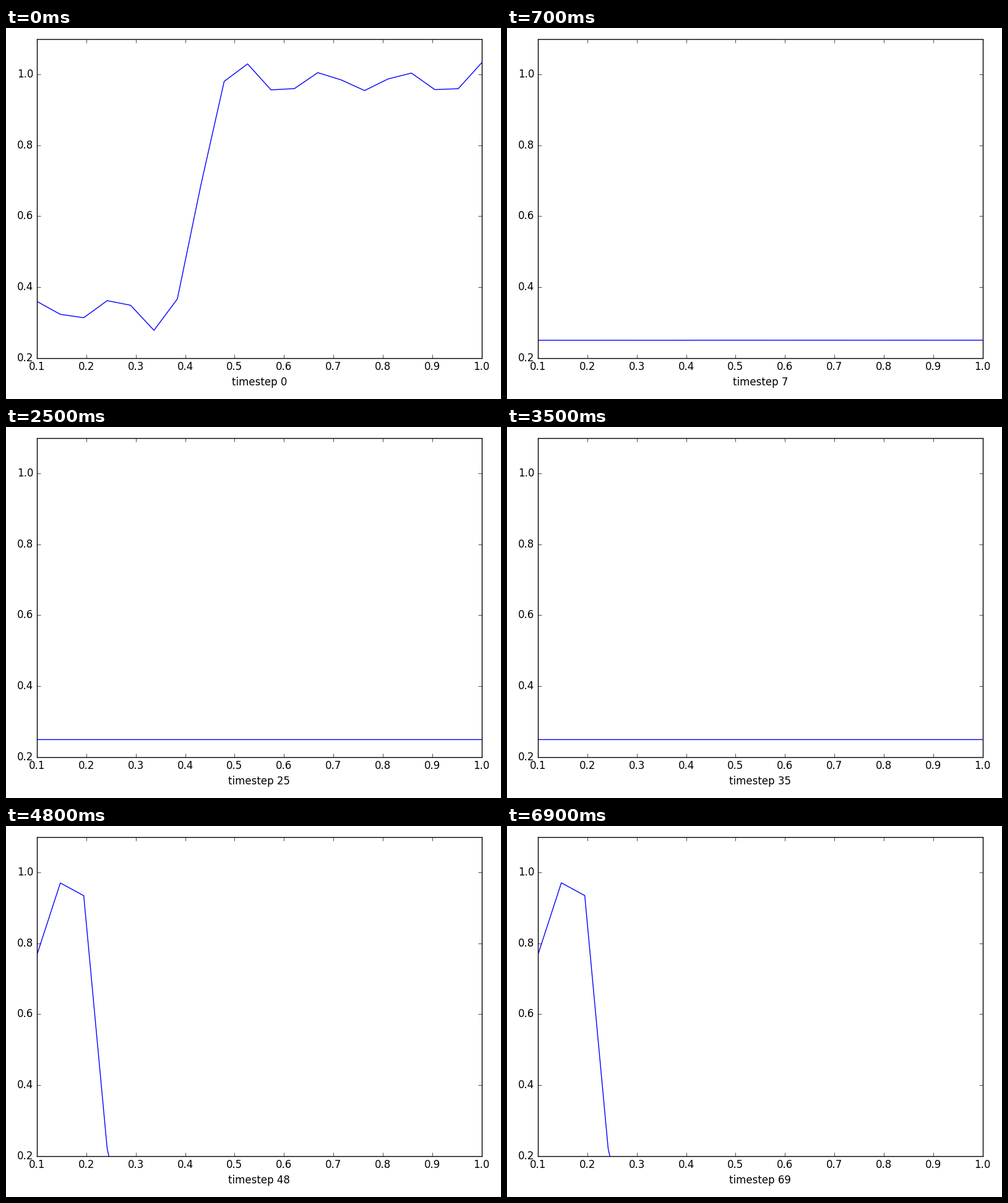
Recreate the animation shown at these times as a matplotlib script. Size 800 px wide and 600 px high, loop 7000 ms.

```python
import numpy as np
import matplotlib.pyplot as plt
from matplotlib.animation import FuncAnimation

W, H, DPI = 800, 600, 100
STEPS, INTERVAL = 70, 100
LEFT, RIGHT, TOP, BOTTOM = 50.0, 768.7, 17.95, 533.65
REST = 0.25

plt.style.use("classic")
plt.rcParams.update({"font.family": "DejaVu Sans", "font.size": 12})

x = np.linspace(0.1, 1.0, 20)


def ringing_step(x, center=0.4278, half_period=0.6679, mid=0.6575, amp=0.3225):
    """Square wave built from its first four odd harmonics."""
    u = np.pi * (x - center) / half_period
    return mid + amp * 4 / np.pi * sum(np.sin(n * u) / n for n in (1, 3, 5, 7))


start = ringing_step(x)
# Only the first points of the final curve rise into view.
end = np.full_like(x, -0.5)
end[:5] = 0.768, 0.971, 0.935, 0.221, -0.08


def curve(step):
    """Curve values at a time step."""
    if step < 9:  # the first curve settles to the rest level
        return REST + (start - REST) * 0.3 ** step
    if step < 12:  # short flat pulse: 1/2, 1/3, 1/4
        return np.full_like(x, 1 / (step - 7))
    # slow departure, then quick convergence
    if step <= 40:
        blend = 0.115 * max(0, step - 35) / 5
    else:
        blend = 1 - 0.885 * 0.4 ** (step - 40)
    return REST + (end - REST) * blend


fig = plt.figure(figsize=(W / DPI, H / DPI), dpi=DPI, facecolor="white")
ax = fig.add_axes([LEFT / W, 1 - BOTTOM / H,
                   (RIGHT - LEFT) / W, (BOTTOM - TOP) / H])
ax.set_xlim(0.1, 1.0)
ax.set_ylim(0.2, 1.1)
ax.set_xticks(np.arange(1, 11) / 10)
ax.set_yticks(np.arange(1, 6) / 5)
ax.xaxis.set_major_formatter("{x:.1f}")
ax.yaxis.set_major_formatter("{x:.1f}")

line, = ax.plot(x, start, color="blue", lw=1)
label = fig.text((LEFT + RIGHT) / 2 / W, 22 / H, "", ha="center", va="baseline")


def update(step):
    line.set_ydata(curve(step))
    label.set_text(f"timestep {step}")
    return line, label


anim = FuncAnimation(fig, update, frames=STEPS, interval=INTERVAL,
                     repeat=True, repeat_delay=0)
plt.show()
```
